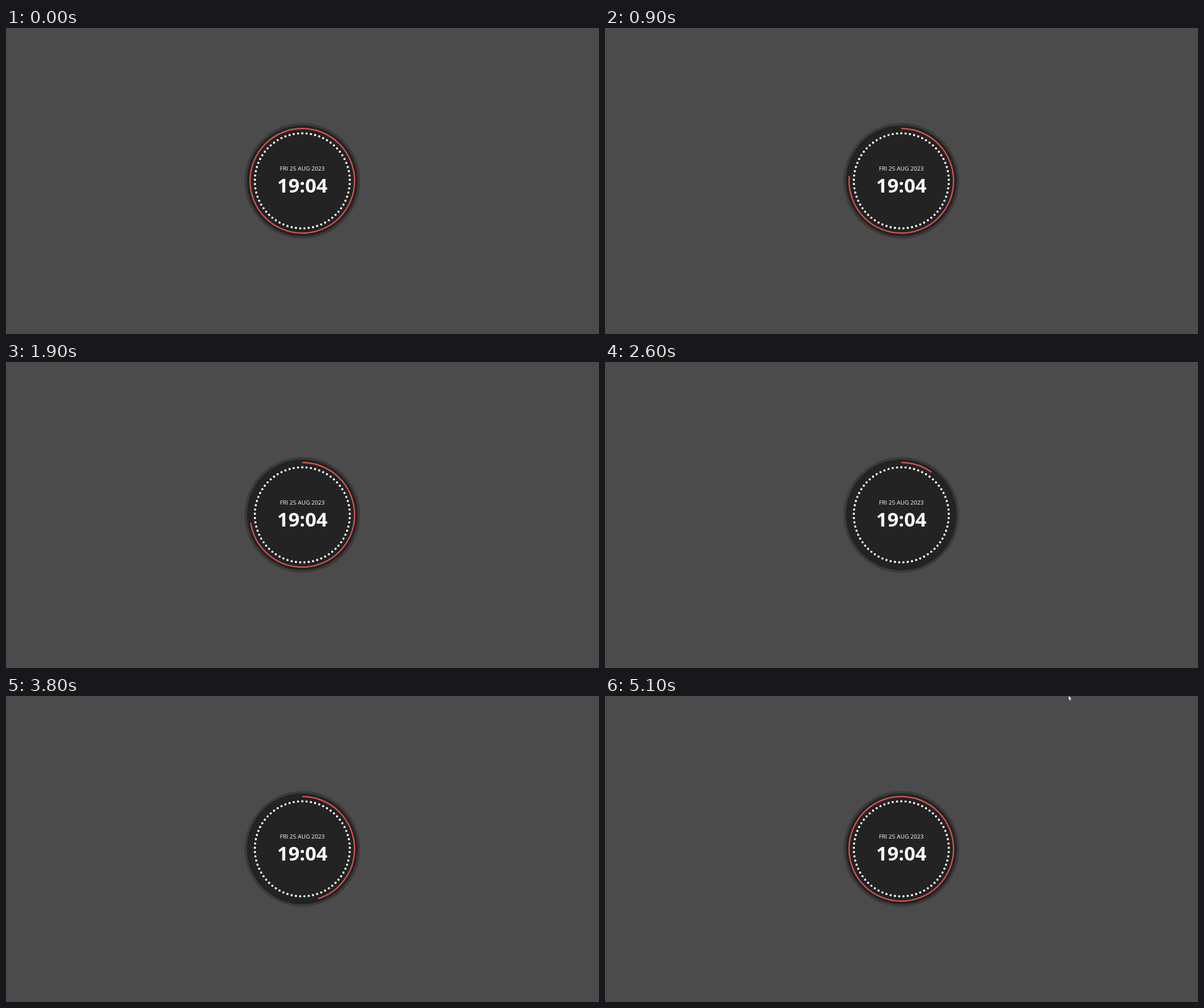
Recreate the animation shown at these times as an HTML page. Size 999 by 515 pixels, loop 5200 ms.

```html
<!DOCTYPE html>
<html lang="en">
<head>
<meta charset="utf-8">
<title>Clock</title>
<style>
  html, body { margin: 0; width: 100%; height: 100%; overflow: hidden; background: #4b4b4b; }
  svg { display: block; }
  text { fill: #fff; text-anchor: middle; font-family: "Open Sans", "Noto Sans", sans-serif; }
  .date { font-size: 9.8px; }
  .time { font-size: 33px; font-weight: 700; }
</style>
</head>
<body>
<svg width="999" height="515" viewBox="0 0 999 515">
  <g transform="translate(499.2 257.2)">
    <circle r="97.5" fill="#3b3b3b"/>
    <circle r="93.3" fill="#232323"/>
    <g transform="rotate(-90)" fill="none">
      <circle id="ring" r="88" pathLength="1" stroke="#d9534f" stroke-width="2.2"/>
      <circle r="80" pathLength="69" stroke="#fff" stroke-width="3.7"
              stroke-linecap="round" stroke-dasharray="0 1"/>
    </g>
    <text class="date" y="-17.2">FRI 25 AUG 2023</text>
    <text class="time" y="20">19:04</text>
  </g>
  <path id="cursor" d="M0 0V8.4L1.9 6.7L3.2 9.6L4.5 9L3.2 6.2H5.4Z"
        fill="#fff" stroke="#222" stroke-width=".5"/>
</svg>
<script>
const LOOP = 5200, STEP = 100;
const TURN = 510;            // ms to draw or erase the whole ring
const POINTER_START = 4000;
const ring = document.getElementById('ring');
const cursor = document.getElementById('cursor');

function drawRing(t) {
  const turns = t / TURN;
  const part = turns % 1;
  const erasing = Math.floor(turns) % 2 === 0;
  ring.setAttribute('stroke-dasharray', `${erasing ? 1 - part : part} 2`);
  ring.setAttribute('stroke-dashoffset', erasing ? -part : 0);
}

// The pointer rushes up from below and slows down at the top edge
function drawPointer(t) {
  const age = t - POINTER_START;
  const x = 781 + 22 * Math.exp(-age / 60) - 4 * Math.exp(-(((age - 300) / 150) ** 2));
  const y = -1 + 150 * Math.exp(-age / 156);
  cursor.setAttribute('visibility', age >= 0 ? 'visible' : 'hidden');
  if (age >= 0) cursor.setAttribute('transform', `translate(${x} ${y})`);
}

const start = performance.now();
function tick() {
  const t = Math.floor((performance.now() - start) % LOOP / STEP) * STEP;
  drawRing(t);
  drawPointer(t);
  requestAnimationFrame(tick);
}
tick();
</script>
</body>
</html>
```
